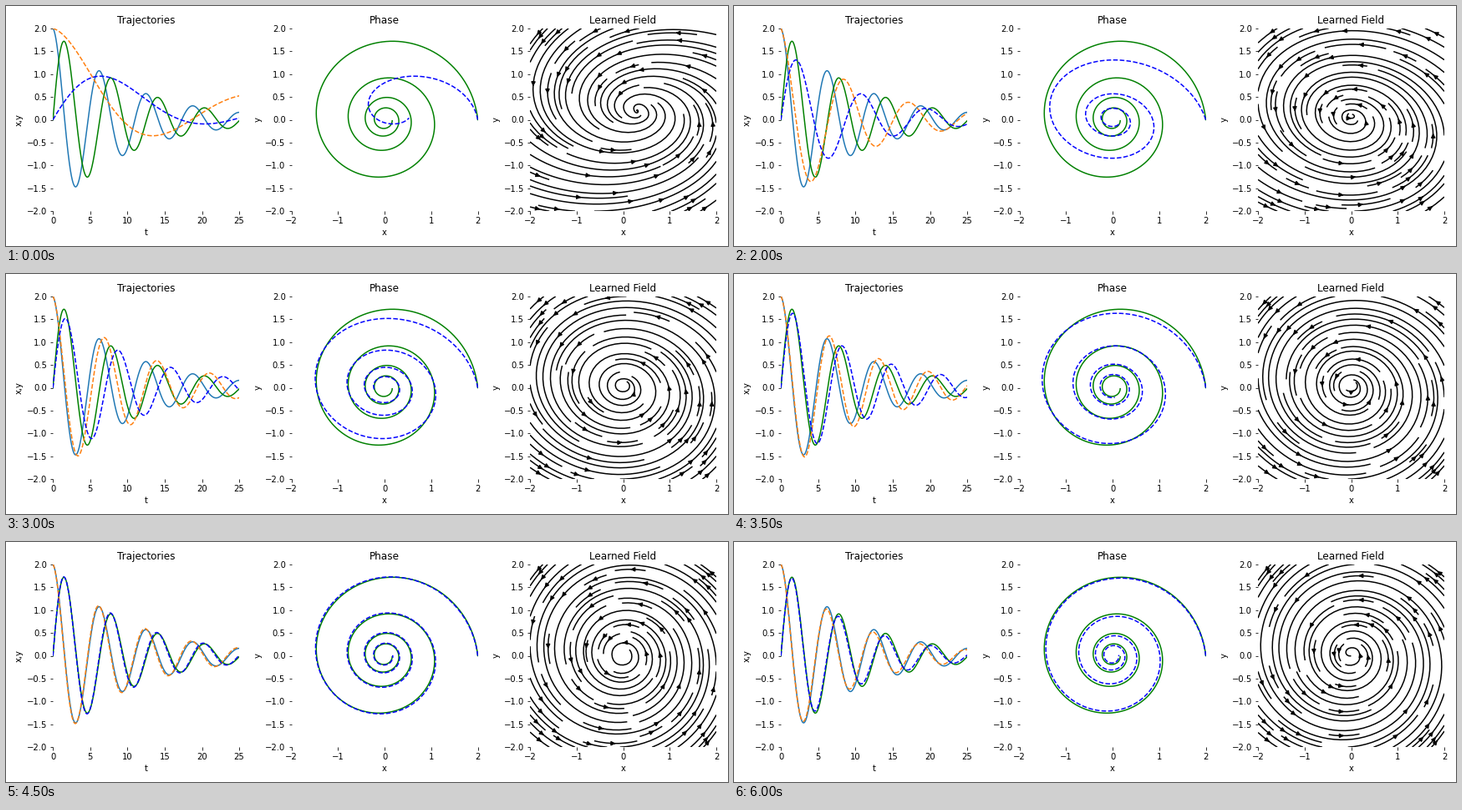
Recreate the animation shown at these times as a matplotlib script. Size 864 px wide and 288 px high, loop 6500 ms.

```python
import numpy as np
import matplotlib.pyplot as plt
from matplotlib.animation import FuncAnimation

STEPS, INTERVAL = 13, 500
START = np.array([2.0, 0.0])
TURN = np.array([[0, -1], [1, 0]])


def learned_spiral(k):
    """Decay, frequency, centre and sine part after training time k (0 to 6)."""
    late = max(k - 2, 0)
    # The decay rises quickly, then swings around its true value of 0.1.
    decay = 0.098 - 0.03 * np.exp(-1.6 * k) - 0.0115 * np.sin(0.4 * np.pi * late)
    freq = 1.01 * np.sin(min(0.225 + 0.285 * k, np.pi / 2))
    centre = np.array([0.31 * np.exp(-3 * k), 0.2 * np.exp(-1.5 * k)])
    # The height settles at a plateau first and then eases up to 2.
    lift = min(late / 2, 1) ** 1.3
    sine = np.array([(0.29 - 1.12 * k) * np.exp(-1.08 * k),
                     1.59 - 0.39 * np.exp(-4 * k) + 0.41 * lift])
    return decay, freq, centre, sine


def trajectory(t, decay, freq, centre, sine):
    cos_part = np.outer(START - centre, np.cos(freq * t))
    sin_part = np.outer(sine, np.sin(freq * t))
    return centre[:, None] + np.exp(-decay * t) * (cos_part + sin_part)


def direction(x, y, decay, freq, centre, sine):
    """Unit vectors of the linear system that produces the trajectory."""
    shape = np.column_stack([START - centre, sine])
    system = freq * shape @ TURN @ np.linalg.inv(shape) - decay * np.eye(2)
    offset = np.array([x - centre[0], y - centre[1]])
    flow = np.tensordot(system, offset, axes=1)
    return flow / (np.hypot(*flow) + 1e-9)


def dress(ax, title, xlabel, ylabel, xlim):
    ax.set_title(title)
    ax.set_xlabel(xlabel)
    ax.set_ylabel(ylabel)
    ax.set_xlim(*xlim)
    ax.set_ylim(-2, 2)


t = np.linspace(0, 25, 1000)
grid_y, grid_x = np.mgrid[-2:2:21j, -2:2:21j]

fig = plt.figure(figsize=(12, 4), dpi=72, facecolor="white")
ax_traj, ax_phase, ax_field = [
    fig.add_subplot(1, 3, i, frameon=False) for i in (1, 2, 3)]

true_x, true_y = trajectory(t, 0.1, 1, np.zeros(2), np.array([0, 2]))
ax_traj.plot(t, true_x, "C0-", t, true_y, "g-")
ax_phase.plot(true_x, true_y, "g-")
line_x, line_y = ax_traj.plot(t, true_x, "C1--", t, true_y, "b--")
line_phase, = ax_phase.plot(true_x, true_y, "b--")

dress(ax_traj, "Trajectories", "t", "x,y", (0, 25))
dress(ax_phase, "Phase", "x", "y", (-2, 2))
dress(ax_field, "Learned Field", "x", "y", (-2, 2))
# A second pass settles the layout on the final label positions.
fig.tight_layout()
fig.tight_layout()


def update(i):
    spiral = learned_spiral(i / 2)
    x, y = trajectory(t, *spiral)
    line_x.set_ydata(x)
    line_y.set_ydata(y)
    line_phase.set_data(x, y)

    ax_field.cla()
    u, v = direction(grid_x, grid_y, *spiral)
    ax_field.streamplot(grid_x, grid_y, u, v, color="black")
    dress(ax_field, "Learned Field", "x", "y", (-2, 2))


anim = FuncAnimation(fig, update, frames=STEPS, interval=INTERVAL,
                     repeat=True, repeat_delay=0)
plt.show()
```
